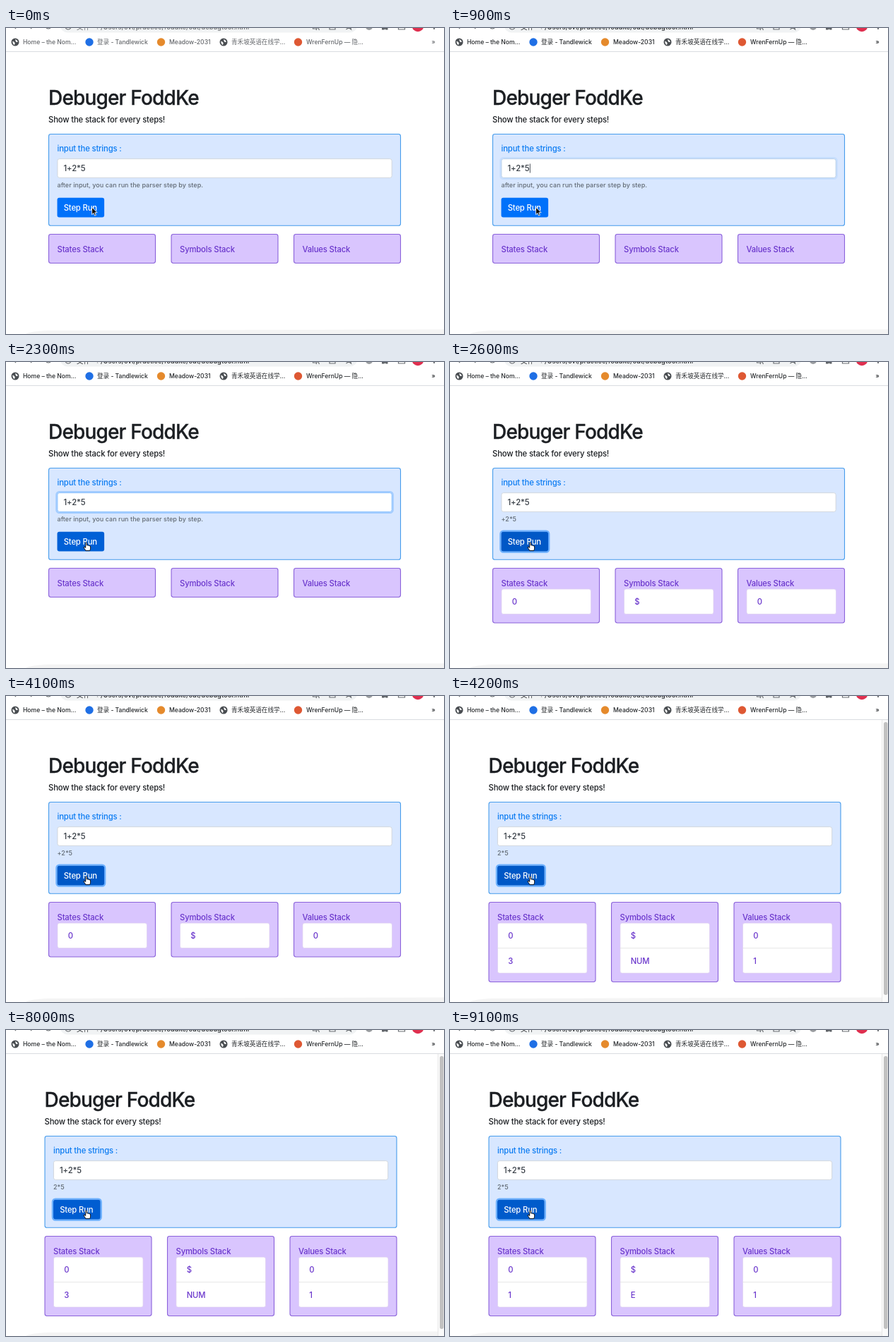
These frames come from a looping animation (620x434 px, 9.2 s). An HTML page:

```html
<!DOCTYPE html>
<html lang="zh-CN">
<head>
<meta charset="utf-8">
<title>Parser stepper</title>
<style>
  html, body { margin: 0; width: 100%; height: 100%; overflow: hidden; background: #fff; }
  svg { display: block; width: 100%; height: 100%; }
  text {
    font: 450 11.25px Inter, "Noto Sans CJK SC", "Noto Sans CJK", sans-serif;
    font-optical-sizing: none;
    letter-spacing: -.14px;
    fill: #1b1e22;
    white-space: pre;
  }
  .title {
    font-size: 28px; font-weight: 500; letter-spacing: -.83px;
    stroke: #1b1e22; stroke-width: .3px;
  }
  .small { font-size: 9px; letter-spacing: .05px; fill: #626b74; }
  .mark { font-size: 8.6px; letter-spacing: -.03px; fill: inherit; }
  .url { font-size: 9.4px; letter-spacing: 0; fill: inherit; }
  .blue { fill: #0a7bf2; }
  .purple { fill: #6a36cc; }
  .field { fill: #343b43; }
  .white { fill: #fff; }
</style>
</head>
<body>
<svg viewBox="0 0 620 434" preserveAspectRatio="xMinYMin meet">
  <rect width="620" height="434" fill="#fff"/>

  <g id="browser">
    <rect x="77" y="-14" width="420" height="20.5" rx="10" fill="#f1f3f4"/>
    <g fill="none" stroke="#6b6f73" stroke-width="1.2">
      <path d="M11 -2L14 1M38 -2L35 1M57 0Q60 2 63 0"/>
      <circle cx="88" cy="-2" r="4"/>
      <path d="M129.500 -5V2" stroke="#b5b8bb"/>
      <path d="M434.500 -4V1H439M439 3L441 -2L443.500 3"/>
      <path d="M458 -4V2H466V-4"/>
      <path d="M481.500 2L485 -.5L488.500 2L487.500 -2"/>
      <path d="M555.500 -4V2H564.500V-4"/>
    </g>
    <circle cx="514" cy="-2" r="5" fill="#9a9da0"/>
    <path d="M532 -4H540.500V2.500H537.500Q536.500 .5 535.500 2.500H532Z" fill="#5f6368"/>
    <circle cx="583" cy="-3" r="8.300" fill="#df2f4f"/>
    <circle cx="606" cy="1" r="1.100" fill="#5f6368"/>
    <path d="M0 33.500H620" stroke="#dadce0"/>
  </g>

  <path d="M28 434Q34 430 60 429L620 427.500V434Z" fill="#f4f4f4"/>

  <g id="page"></g>

  <g id="scrollbar">
    <rect x="611" y="34" width="9" height="400" fill="#fafafa"/>
    <path d="M611.500 34V434" stroke="#e8e8e8"/>
    <rect x="614" y="37" width="5.500" height="387" rx="2.700" fill="#c1c1c1"/>
  </g>

  <g id="cursor" stroke-width=".9" stroke-linejoin="round">
    <path id="arrow" d="M0 0V10.500L2.400 8.300L4 12L5.800 11.200L4.200 7.600H7.500Z" fill="#000" stroke="#fff"/>
    <path id="hand" d="M-.9 .9Q0 -.4 .9 .9V4.400Q2 3.600 2.700 4.700Q3.900 4.100 4.500 5.200Q6 4.900 6 6.400V8.500Q6 10 5 12H-.9Q-1.600 10 -3.200 8.200Q-4.200 6.400 -2.600 6.600L-.9 7.800Z" fill="#fff" stroke="#000"/>
  </g>
</svg>
<script>
const LOOP = 9200;
const $ = id => document.getElementById(id);

function add(parent, tag, attrs, content) {
  const node = document.createElementNS('http://www.w3.org/2000/svg', tag);
  set(node, attrs);
  if (content !== undefined) node.textContent = content;
  return parent.appendChild(node);
}
function set(node, attrs) {
  for (const key in attrs) node.setAttribute(key, attrs[key]);
}
const label = (parent, x, y, content, cls = '') =>
  add(parent, 'text', { x, y, class: cls }, content);
const box = (parent, x, y, width, height, attrs) =>
  add(parent, 'rect', { x, y, width, height, rx: 2.9, ...attrs });
const show = (node, on) => set(node, { visibility: on ? 'visible' : 'hidden' });
const ramp = (t, start, length) => Math.min(1, Math.max(0, (t - start) / length));
const smooth = k => k * k * (3 - 2 * k);

// Browser bars; their labels share one colour that follows the window focus
const browser = $('browser');
const barText = add(browser, 'g', {});
label(barText, 100, 2, '文件', 'url');
label(barText, 134, 2, '/Users/ovi/practice/foddke/out/debugtool.html', 'url');

function globe(x) {
  add(browser, 'circle', { cx: x, cy: 20, r: 5.5, fill: '#4a4e52' });
  add(browser, 'path', {
    d: 'M-3.600 -1.500Q-1 -.5 -.5 1T-1.200 4Q-3.800 2.800 -3.600 -1.500ZM0 -4Q3 -3.500 3.800 -.5Q1.500 .8 .8 -1Z',
    transform: `translate(${x} 20)`, fill: '#fff'
  });
}
globe(13);
globe(308);
[[118, '#1f6fe5'], [219.5, '#e58a2c'], [413.5, '#de5833']].forEach(([cx, fill]) =>
  add(browser, 'circle', { cx, cy: 20, r: 5.7, fill }));
[[24, 'Home – the Nom...'], [129, '登录 - Tandlewick'], [231, 'Meadow-2031'],
 [319, '青禾坡英语在线学...'], [425, 'WrenFernUp — 隐...'], [602.5, '»']]
  .forEach(([x, name]) => label(barText, x, 23.3, name, 'mark'));

// Page
const page = $('page');
label(page, 60, 108.5, 'Debuger FoddKe', 'title');
label(page, 60, 133.8, 'Show the stack for every steps!');

box(page, 60.5, 150.5, 498, 129.8, { fill: '#d8e7ff', stroke: '#469cec', 'stroke-width': 1.1 });
label(page, 72.5, 175, 'input the strings :', 'blue');

const fieldRing = box(page, 71.4, 184.1, 476.2, 29.8,
  { rx: 4, fill: 'none', stroke: '#007bff', 'stroke-width': 2.3 });
const field = box(page, 72.9, 185.6, 473.3, 26.8, { fill: '#fff', 'stroke-width': .9 });
label(page, 81.6, 203.2, '1+2*5', 'field');
const caret = add(page, 'path', { d: 'M113.300 192.500V205.500', stroke: '#343b43', 'stroke-width': .9 });
const hint = label(page, 72.5, 226, '', 'small');

const buttonRing = box(page, 71.4, 239.7, 68.8, 29.8,
  { rx: 4, fill: 'none', stroke: '#007bff', 'stroke-width': 2.3 });
const button = box(page, 72.5, 240.8, 66.6, 27.6);
label(page, 81.7, 259, 'Step Run', 'white');

const cards = ['States', 'Symbols', 'Values'].map((name, i) => {
  const g = add(page, 'g', { transform: `translate(${i * 173.5} 0)` });
  const frame = box(g, 60.5, 292.5, 151, 41, { fill: '#d9c5fe', stroke: '#8a62da', 'stroke-width': 1.1 });
  label(g, 72.5, 317.8, name + ' Stack', 'purple');
  const list = box(g, 72.9, 322.1, 126.6, 35.5, { fill: '#fff', stroke: '#dccdf0', 'stroke-width': .7 });
  const rule = add(g, 'path', { d: 'M73 357.600H199.500', stroke: '#dfdfdf', 'stroke-width': .8 });
  const cells = [344.2, 379.7].map(y => label(g, 87.7, y, '', 'purple'));
  return { frame, list, rule, cells };
});

// Stack contents after each click: states, symbols, values
const steps = [
  { at: 0, hint: 'after input, you can run the parser step by step.', rows: [] },
  { at: 2600, hint: '+2*5', rows: ['0$0'] },
  { at: 4200, hint: '2*5', rows: ['0$0', ['3', 'NUM', '1']] },
  { at: 8200, hint: '2*5', rows: ['0$0', '1E1'] }
];
const FOCUS_AT = 900, HOVER_AT = 1700, PRESS_AT = 2350, FADE = 150;
const presses = [[PRESS_AT, 2600], [3950, 4200], [7950, 8200], [9000, LOOP]];

const BASE = [0, 113, 250], HOVER = [0, 96, 214], ACTIVE = [0, 88, 198];
const IDLE = [206, 212, 218], FOCUS = [128, 189, 255];
const mix = (a, b, k) => a.map((v, i) => v + (b[i] - v) * k);
const rgb = c => `rgb(${c.map(Math.round)})`;

function draw(t) {
  const step = steps.filter(s => t >= s.at).pop();
  const count = step.rows.length;
  const scrolls = count > 1;

  set(barText, { fill: t < FOCUS_AT ? '#66696d' : '#25282b' });
  set(page, { transform: `translate(${scrolls ? -5.5 : 0} 0)` });
  show($('scrollbar'), scrolls);
  hint.textContent = step.hint;

  cards.forEach(({ frame, list, rule, cells }, i) => {
    set(frame, { height: count ? 42 + count * 35.5 : 41 });
    set(list, { height: Math.max(1, count) * 35.5 });
    show(list, count > 0);
    show(rule, scrolls);
    cells.forEach((cell, r) => cell.textContent = count > r ? step.rows[r][i] : '');
  });

  const leave = ramp(t, PRESS_AT, FADE);
  const fieldFocus = ramp(t, FOCUS_AT - 50, FADE) * (1 - leave);
  set(fieldRing, { opacity: .25 * fieldFocus });
  set(field, { stroke: rgb(mix(IDLE, FOCUS, fieldFocus)) });
  show(caret, (t >= FOCUS_AT && t < 1300) || (t >= 1800 && t < 2300));

  const pressed = Math.max(...presses.map(([down, up]) =>
    ramp(t, down, FADE) * (1 - ramp(t, up, FADE))));
  const hovered = mix(BASE, HOVER, ramp(t, HOVER_AT, FADE));
  set(buttonRing, { opacity: .5 * leave });
  set(button, { fill: rgb(mix(hovered, ACTIVE, pressed)) });

  const move = smooth(ramp(t, HOVER_AT, 400));
  set($('cursor'), { transform: `translate(${121.6 - 8 * move} ${254.2 + 1.4 * move})` });
  show($('arrow'), t < HOVER_AT);
  show($('hand'), t >= HOVER_AT);
}

const start = performance.now();
function tick() {
  const t = (performance.now() - start) % LOOP;
  draw(Math.floor(t / 100) * 100);
  requestAnimationFrame(tick);
}
draw(0);
requestAnimationFrame(tick);
</script>
</body>
</html>
```
